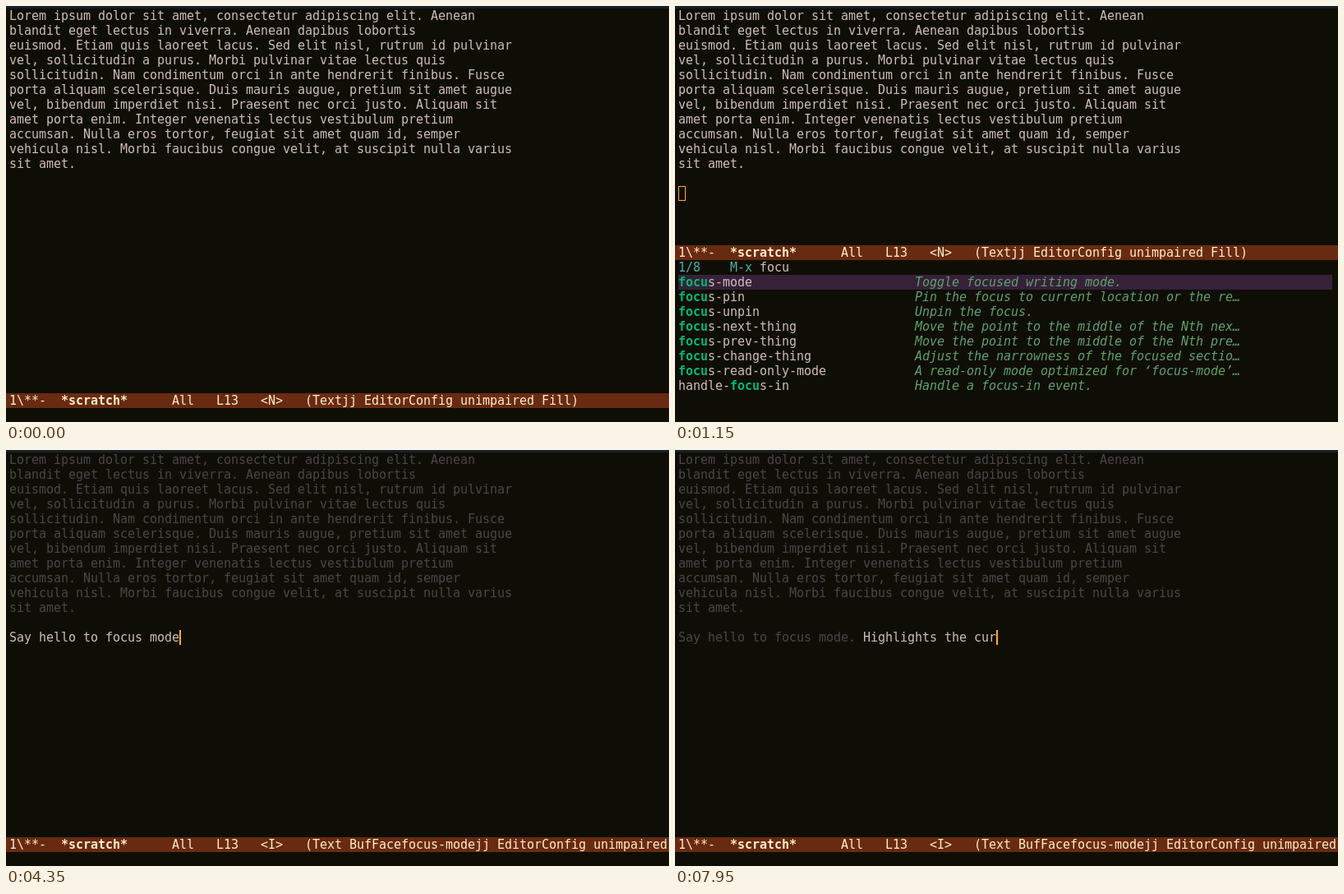
An HTML page with a canvas that plays this animation: 807x506 px, repeating every 8 s.

```html
<!DOCTYPE html>
<html lang="en">
<head>
<meta charset="utf-8">
<title>Focus mode</title>
<style>
  html, body { margin: 0; width: 100%; height: 100%; overflow: hidden; background: #0f0e06; }
  canvas { display: block; width: 807px; height: 506px; }
</style>
</head>
<body>
<canvas id="stage" width="807" height="506"></canvas>
<script>
const ctx = document.getElementById('stage').getContext('2d');
const W = 807, H = 506, LOOP = 8000;
const CELL = 9, LINE = 18, LEFT = 4, TOP = 3, ASCENT = 14;
const FONT = '15px "DejaVu Sans Mono", monospace';
const color = {
  bg: '#0f0e06', strip: '#18212c', fg: '#cfbcba', dim: '#4b4548', cursor: '#ffaa33',
  bar: '#692a12', barText: '#feeeca', select: '#36213a', prompt: '#4fb0a5',
  match: '#00b672', doc: '#61a06c', key: '#ea6a30'
};

const paragraph = [
  'Lorem ipsum dolor sit amet, consectetur adipiscing elit. Aenean',
  'blandit eget lectus in viverra. Aenean dapibus lobortis',
  'euismod. Etiam quis laoreet lacus. Sed elit nisl, rutrum id pulvinar',
  'vel, sollicitudin a purus. Morbi pulvinar vitae lectus quis',
  'sollicitudin. Nam condimentum orci in ante hendrerit finibus. Fusce',
  'porta aliquam scelerisque. Duis mauris augue, pretium sit amet augue',
  'vel, bibendum imperdiet nisi. Praesent nec orci justo. Aliquam sit',
  'amet porta enim. Integer venenatis lectus vestibulum pretium',
  'accumsan. Nulla eros tortor, feugiat sit amet quam id, semper',
  'vehicula nisl. Morbi faucibus congue velit, at suscipit nulla varius',
  'sit amet.'
];

const focusMode = ['focus-mode', 'Toggle focused writing mode.'];
const fontLock = ['font-lock-mode', 'Toggle syntax highlighting in this buffer (…'];
const info = ['info', 'Enter Info, the documentation browser.', '(C-h l)'];

const lists = {
  '': { count: '1/9814', rows: [
    focusMode, fontLock,
    ['text-mode', 'Major mode for editing text written for hum…'],
    ['eval-buffer', 'Execute the accumulated current buffer as L…'],
    ['5x5', 'Play 5x5.'],
    ['dbx', 'Run dbx on program FILE in buffer ‘*gud-FIL…'],
    ['eww', 'Fetch URL and render the page.'],
    ['gdb', 'Run GDB passing it COMMAND-LINE as argument…'],
    ['irc', 'Connect to IRC.'],
    ['man', 'Get a Un*x manual page and put it in a buff…']
  ] },
  f: { count: '1/2764', rows: [
    focusMode, fontLock,
    ['ffap', 'Find FILENAME, guessing a default from text…'],
    info,
    ['diff', 'Find and display the differences between OL…'],
    ['ediff', 'Compare files side by side.'],
    ['ffap-menu', 'Put up a menu of files and URLs mentioned i…'],
    ['Info-up', 'Go to the superior node of this node.'],
    ['fortune', 'Display a fortune cookie.'],
    ['find-file', 'Edit file FILENAME.', '(C-x C-f)']
  ] },
  fo: { count: '1/372', rows: [
    focusMode, fontLock, info,
    ['Info-up', 'Go to the superior node of this node.'],
    ['fortune', 'Display a fortune cookie.'],
    ['Info-toc', 'Go to a node with table of contents of the …'],
    ['org-info', 'Read documentation for Org in the info syst…'],
    ['Info-help', 'Enter the Info tutorial.'],
    ['Info-last', 'Go back in the history to the last node vis…'],
    ['Info-menu', 'Go to the node pointed to by the menu item …']
  ] },
  foc: { count: '1/8', rows: [
    focusMode,
    ['focus-pin', 'Pin the focus to current location or the re…'],
    ['focus-unpin', 'Unpin the focus.'],
    ['focus-next-thing', 'Move the point to the middle of the Nth nex…'],
    ['focus-prev-thing', 'Move the point to the middle of the Nth pre…'],
    ['focus-change-thing', 'Adjust the narrowness of the focused sectio…'],
    ['focus-read-only-mode', 'A read-only mode optimized for ‘focus-mode’…'],
    ['handle-focus-in', 'Handle a focus-in event.']
  ] }
};
lists.focu = lists.foc;

// [time, typed input, list shown]
const queries = [
  [70, '', ''], [380, 'f', ''], [410, 'f', 'f'], [470, 'fo', 'f'], [500, 'fo', 'fo'],
  [530, 'foc', 'fo'], [580, 'foc', 'foc'], [660, 'focu', 'focu']
];

// [first key, last key, text]; '<' erases one character
const bursts = [
  [2350, 2350, 'S'], [2510, 2950, 'ay hel'], [3080, 3270, 'lo '], [3340, 3850, 'to focu'],
  [4010, 4350, 's mode'], [4810, 4810, '.'], [5210, 5210, ' '], [5440, 5440, 'H'],
  [6220, 6220, '<'], [6420, 6420, 'H'], [6620, 6760, 'igh'], [6860, 7370, 'lights t'],
  [7440, 7950, 'he cur']
];
const keys = bursts.flatMap(([from, to, text]) => [...text].map((key, i) =>
  ({ key, time: from + (to - from) * i / Math.max(1, text.length - 1) })));

const xOf = col => LEFT + col * CELL;
const yOf = row => TOP + row * LINE;

function rect(x, y, w, h, fill) {
  ctx.fillStyle = fill;
  ctx.fillRect(x, y, w, h);
}

// Writes on the character grid and returns the next free column.
function write(text, col, row, fill, style = '') {
  ctx.font = style + ' ' + FONT;
  ctx.fillStyle = fill;
  for (const ch of text) {
    if (ch !== ' ') ctx.fillText(ch, xOf(col), yOf(row) + ASCENT);
    col++;
  }
  return col;
}

const block = (col, row) => rect(xOf(col), yOf(row), CELL, LINE, color.cursor);
const bar = (col, row) => rect(xOf(col), yOf(row), 2, LINE, color.cursor);

function hollow(col, row) {
  ctx.strokeStyle = color.cursor;
  ctx.lineWidth = 1;
  ctx.strokeRect(xOf(col) + 0.5, yOf(row) + 0.5, CELL - 1, LINE - 1);
}

function modeLine(row, state, modes) {
  rect(0, yOf(row), W, LINE, color.bar);
  write('1\\**-', 0, row, color.barText);
  write('*scratch*', 7, row, color.barText, 'bold');
  write(`All   L13   <${state}>   (${modes} EditorConfig unimpaired Fill)`, 22, row, color.barText);
}

function candidate([name, doc, key], row, match) {
  const at = name.indexOf(match), end = at + match.length;
  let col = write(name.slice(0, at), 0, row, color.fg);
  col = write(name.slice(at, end), col, row, color.match, 'bold');
  col = write(name.slice(end), col, row, color.fg);
  if (key) write(key, col + 1, row, color.key, 'italic bold');
  write(doc, 32, row, color.doc, 'italic');
}

function minibuffer(t) {
  const [, input, shown] = queries.filter(q => q[0] <= t).pop();
  const list = lists[shown];
  hollow(0, 12);
  modeLine(16, 'N', 'Textjj');
  write(list.count.padEnd(7) + 'M-x', 0, 17, color.prompt);
  const end = write(input, 11, 17, color.fg);
  if (t < 1150) block(end, 17);
  rect(LEFT, yOf(18), 796, LINE, color.select);
  list.rows.forEach((item, i) => candidate(item, 18 + i, shown));
}

function writing(t) {
  modeLine(26, t < 2080 ? 'N' : 'I', 'Text BufFacefocus-modejj');
  if (t < 2080) {
    write('Focus mode enabled in current buffer', 0, 27, color.fg);
    if (t < 1980) block(0, 12);
    return;
  }
  if (t < 2350) write('-- INSERT --', 0, 27, color.fg);

  let text = '';
  for (const { key, time } of keys) {
    if (time <= t) text = key === '<' ? text.slice(0, -1) : text + key;
  }
  const split = t < 5440 ? 0 : text.indexOf('.') + 1;
  const col = write(text.slice(0, split), 0, 12, color.dim);
  const end = write(text.slice(split), col, 12, color.fg);
  const blinkedOff = t >= 5980 && t < 6220;
  if (!blinkedOff) bar(end, 12);
}

function draw(t) {
  rect(0, 0, W, H, color.bg);
  rect(0, 0, W, 3, color.strip);
  paragraph.forEach((line, i) => write(line, 0, i, t < 1480 ? color.fg : color.dim));
  if (t < 70) modeLine(26, 'N', 'Textjj');
  else if (t < 1480) minibuffer(t);
  else writing(t);
}

const start = performance.now();
function tick() {
  draw((performance.now() - start) % LOOP);
  requestAnimationFrame(tick);
}
tick();
</script>
</body>
</html>
```
